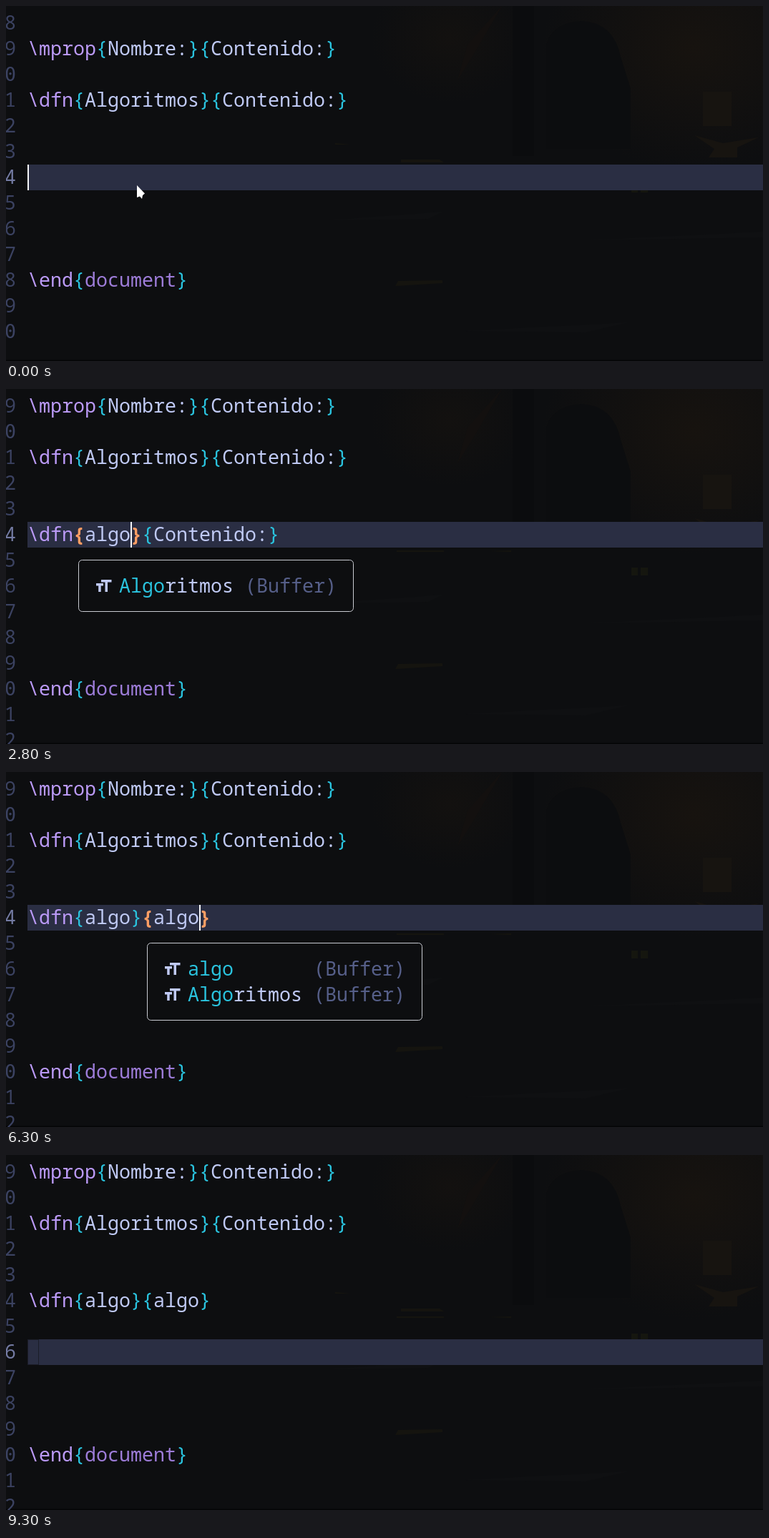
These frames come from a looping animation (1058x497 px, 9500 ms). An HTML page:

```html
<!DOCTYPE html>
<html lang="es">
<head>
<meta charset="utf-8">
<title>Editor</title>
<style>
  html, body { margin: 0; width: 100%; height: 100%; overflow: hidden; background: #0d0e10; }
  svg { display: block; width: 1058px; height: 497px; }
  text { font: 26.667px "Noto Sans Mono", "DejaVu Sans Mono", monospace; white-space: pre; fill: #c0caf5; }
  .cmd { fill: #bb9af7; }
  .brace, .hit { fill: #2ac3de; }
  .match { fill: #ff9e64; font-weight: 700; }
  .env { fill: #9d7cd8; }
  .source { fill: #565f89; }
  .num { fill: #3b4261; }
  .num.now { fill: #737aa2; }
  .zero { font-family: "DejaVu Sans Mono", monospace; }
</style>
</head>
<body>
<svg viewBox="0 0 1058 497" xmlns="http://www.w3.org/2000/svg">
  <defs>
    <radialGradient id="glow">
      <stop offset="0" stop-color="#17130f"/>
      <stop offset="1" stop-color="#17130f" stop-opacity="0"/>
    </radialGradient>
  </defs>
  <rect width="1058" height="497" fill="#0d0e10"/>
  <!-- faint wallpaper -->
  <ellipse cx="960" cy="60" rx="210" ry="170" fill="url(#glow)"/>
  <ellipse cx="620" cy="45" rx="110" ry="90" fill="url(#glow)" opacity=".6"/>
  <path d="M708 0h30v210h-30z" fill="#0b0c0e"/>
  <path d="M755 200V55q8-32 50-34 44 2 54 50l14 45v84z" fill="#0c0d0f"/>
  <path d="M974 120h40v48h-40z" fill="#171410"/>
  <path d="M962 181l40 11 50-8-30 14v14h-40l8-12z" fill="#171410"/>
  <path d="M693 0l-36 62-26 42 14-50z" fill="#13100f"/>
  <path d="M552 215h54l6 4h-60zM546 226h66v2h-66zM548 385l62-1v4l-66 4zM460 192l22 2h-22zM676 227l30-1v2z" fill="#15140f"/>
  <path d="M874 250h9v11h-9zM887 250h10v11h-10z" fill="#15160f"/>
  <path d="M450 300l160-12-20 10zM810 328l248-12v8zM640 455l230-12-60 14z" fill="#0f1012"/>
  <path d="M0 495.500h1058v1.500H0z" fill="#050506"/>
  <g id="view"></g>
</svg>
<script>
const LOOP = 9500, LEFT = 30, TOP = 6, CELL = 16, ROW = 36;
const view = document.getElementById('view');

// [start, field, typed, menu open, picked row]
const steps = [
  [0, 'start', ''], [200, 'start', 'd'], [400, 'start', 'df'], [600, 'start', 'dfn'],
  [800, 'name', ''],
  [1400, 'name', 'a'], [1500, 'name', 'a', true], [1600, 'name', 'al', true],
  [1700, 'name', 'alg', true], [1800, 'name', 'algo', true],
  [2200, 'name', 'algo', true, 0], [2400, 'name', 'algo', true],
  [2600, 'name', 'algo', true, 0], [2800, 'name', 'algo', true],
  [3900, 'name', 'algo'],
  [4700, 'body', ''],
  [5300, 'body', 'a'], [5400, 'body', 'a', true], [5500, 'body', 'al', true],
  [5600, 'body', 'alg', true], [5700, 'body', 'algo', true],
  [6000, 'body', 'algo', true, 0], [6200, 'body', 'algo', true, 1], [6300, 'body', 'algo', true],
  [6500, 'body', 'algo', true, 0], [6600, 'body', 'algo', true, 1], [6700, 'body', 'algo', true],
  [7400, 'body', 'algo'],
  [7800, 'done', 'on'], [9300, 'done', 'off']
];
const words = ['Algoritmos', 'apartado', 'axioma', 'anexo', 'autor'];

const colX = c => LEFT + c * CELL;
const rowY = r => TOP + r * ROW;
const rect = (x, y, w, h, fill, more = '') =>
  `<rect x="${x}" y="${y}" width="${w}" height="${h}" fill="${fill}" ${more}/>`;
const text = (x, row, s, cls = '') =>
  `<text x="${x}" y="${rowY(row) + 27}" class="${cls}">${s}</text>`;

function line(row, tokens) {
  let col = 0;
  return tokens.map(([s, cls]) => {
    const out = text(colX(col), row, s, cls);
    col += s.length;
    return out;
  }).join('');
}

function macro(name, first, second, active) {
  const group = (s, on) => {
    const cls = on ? 'match' : 'brace';
    return [['{', cls], [s], ['}', cls]];
  };
  return [['\\' + name, 'cmd'], ...group(first, active === 'name'), ...group(second, active === 'body')];
}

function numbers(first, last, current) {
  let out = '';
  for (let n = first; n <= last; n++) {
    const cls = 'num' + (n === current ? ' now' : '') + (n % 10 ? '' : ' zero');
    out += text(-2, n - first, n % 10, cls);
  }
  return out;
}

const cursorLine = row => rect(LEFT, rowY(row), 1058 - LEFT, ROW, '#2a2e43');
const bar = (col, row) => rect(colX(col), rowY(row), 2, ROW, '#f4f5f8');

function menu(col, items, hits, pick) {
  const x = colX(col), y = rowY(7);
  let out = rect(x - 8.5, y - 18.5, 384, items.length * ROW + 36, '#0d0e10',
    'rx="5" stroke="#c9cbd2"');
  items.forEach((word, i) => {
    const top = y + i * ROW;
    if (i === pick) out += rect(x, top, 23 * CELL, ROW, '#343a55');
    out += `<path transform="translate(${x + 16} ${top})" fill="#c0caf5"
      d="M7 9h14.500v3.500h-5.500v13.500h-3.500v-13.500h-5.500zM0 14h10v3.500h-3.300v8.500h-3.500v-8.500h-3.200z"/>`;
    out += text(x + 48, 7 + i, word.slice(0, hits), 'hit');
    out += text(x + 48 + hits * CELL, 7 + i, word.slice(hits));
    out += text(x + 224, 7 + i, '(Buffer)', 'source');
  });
  return out;
}

const page = shift =>
  line(1 - shift, macro('mprop', 'Nombre:', 'Contenido:')) +
  line(3 - shift, macro('dfn', 'Algoritmos', 'Contenido:')) +
  line(10 + shift, [['\\end', 'cmd'], ['{', 'brace'], ['document', 'env'], ['}', 'brace']]);

function startScene(typed) {
  const pointer = typed ? '' :
    '<path d="M183 251v17l4-1.500 3 3.500 1-5 3-2.500z" fill="#fff"/>';
  return cursorLine(6) + numbers(18, 30, 24) + page(0) +
    line(6, [[typed]]) + bar(typed.length, 6) + pointer;
}

function doneScene(blink) {
  const y = rowY(7);
  const cursor = blink === 'on'
    ? rect(LEFT, y, CELL, ROW, '#eceef4')
    : rect(LEFT + .5, y + .5, CELL - 1, ROW - 1, 'none', 'stroke="#1b1d28"');
  return cursorLine(7) + numbers(19, 32, 26) + page(1) +
    line(5, macro('dfn', 'algo', 'algo')) + cursor;
}

function fieldScene(field, typed, open, pick = -1) {
  const inName = field === 'name';
  const col = inName ? 5 : 11;
  const known = inName ? words : ['algo', ...words];
  const items = known.filter(w => w.toLowerCase().startsWith(typed));
  const hint = inName ? 'Nombre:' : 'Contenido:';
  const value = items[pick] && typed ? items[pick] : typed;
  // the block cursor hides the first letter of a selected hint
  const shown = value || ' ' + hint.slice(1);
  const tokens = inName
    ? macro('dfn', shown, 'Contenido:', typed && field)
    : macro('dfn', 'algo', shown, typed && field);
  const back = typed ? cursorLine(5) :
    rect(colX(col), rowY(5), CELL, ROW, '#eeeff3') +
    rect(colX(col + 1), rowY(5), (hint.length - 1) * CELL, ROW, '#2d59a1');
  return back + numbers(19, 32, 24) + page(1) + line(5, tokens) +
    (typed ? bar(col + value.length, 5) : '') +
    (open ? menu(col, items, typed.length, pick) : '');
}

function render([, field, typed, open, pick]) {
  if (field === 'start') return startScene(typed);
  if (field === 'done') return doneScene(typed);
  return fieldScene(field, typed, open, pick);
}

const begin = performance.now();
let current;
function tick() {
  const t = (performance.now() - begin) % LOOP;
  const step = steps.findLast(s => s[0] <= t);
  if (step !== current) {
    current = step;
    view.innerHTML = render(step);
  }
  requestAnimationFrame(tick);
}
tick();
</script>
</body>
</html>
```
